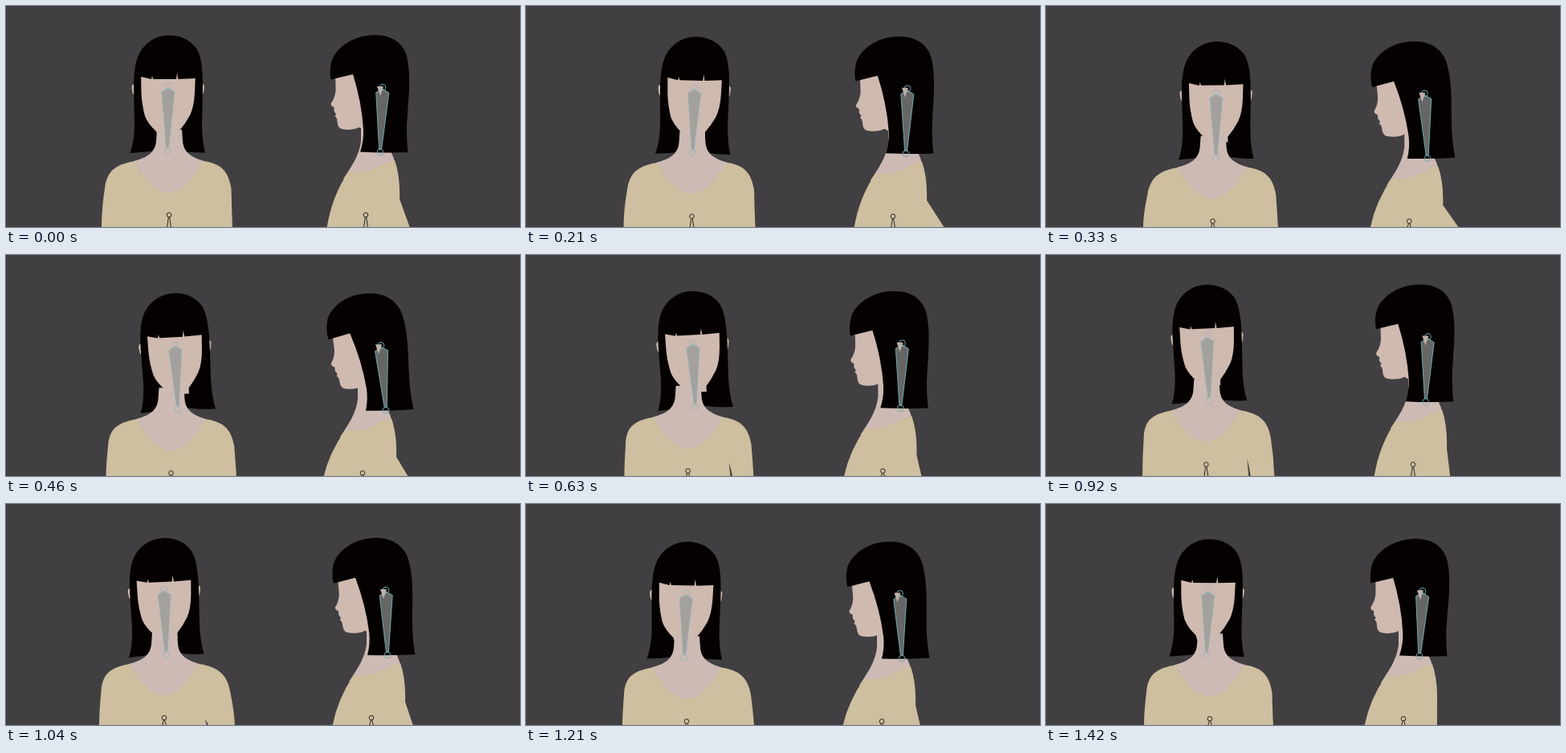
An HTML page with a canvas for the animation above (1.46 s loop, 640x275 px).

```html
<!DOCTYPE html>
<html lang="en">
<head>
<meta charset="utf-8">
<title>Walk cycle, front and side</title>
<style>
  html, body { margin: 0; height: 100%; overflow: hidden; background: #413f41; }
  canvas { display: block; }
</style>
</head>
<body>
<canvas id="stage" width="640" height="275"></canvas>
<script>
const ctx = document.getElementById('stage').getContext('2d');
const LOOP = 1460, CYCLE = 36, FPS = 24;
const BG = '#413f41', SKIN = '#cfbab0', NECK = '#cdbab4', SHIRT = '#cdbf9f', HAIR = '#060101';
const POSES = [0, 5, 11, 19, 25, 29, 34];

// Periodic spline through the key poses. With `mirror`, each pose also
// defines the opposite step half a cycle later.
function track(values, mirror, opposite = values) {
  const keys = POSES.map((t, i) => [t, values[i]]);
  if (mirror) POSES.forEach((t, i) => {
    const other = (t + CYCLE / 2) % CYCLE;
    if (!POSES.includes(other)) keys.push([other, mirror(opposite[i])]);
  });
  keys.sort((a, b) => a[0] - b[0]);
  const n = keys.length;
  const key = i => {
    const k = keys[(i + n) % n];
    return [k[0] + Math.floor(i / n) * CYCLE, k[1]];
  };
  const slope = i => {
    const a = key(i - 1), b = key(i + 1);
    return (b[1] - a[1]) / (b[0] - a[0]);
  };
  return f => {
    let i = n - 1;
    while (key(i)[0] > f) i--;
    const [t0, v0] = key(i), [t1, v1] = key(i + 1);
    const d = t1 - t0, u = (f - t0) / d, w = 1 - u;
    return w * w * ((1 + 2 * u) * v0 + u * d * slope(i)) +
           u * u * ((3 - 2 * u) * v1 - w * d * slope(i + 1));
  };
}

const same = v => v;
const around = m => v => 2 * m - v;
const leftArm = [-84, -85, -81, -81, -81, -80, -82];
const rightArm = [79, 79, 81.5, 86, 88, 84, 79];
const motion = {
  bob: track([0, 1.7, 11.3, -1.4, 6, 10.4, 7.2], same),
  frontChest: track([203, 206.5, 205.5, 202, 197, 200, 204], around(202.5)),
  frontNeck: track([201, 207.5, 214, 205, 199.5, 197, 200], around(205)),
  frontCrown: track([202, 210, 210.5, 206, 197, 199.5, 202], around(204.5)),
  sideChest: track([448, 457, 444, 455, 455, 443, 445], same),
  sideNeck: track([466, 473, 473, 472, 475, 468, 465], same),
  sideCrown: track([469, 475, 467, 475, 473, 465.5, 469], same),
  left: track(leftArm, v => -v, rightArm),
  right: track(rightArm, v => -v, leftArm),
  elbow: track([55, 64, 57, 42, 52, 48, 42])
};

const fill = (path, color) => {
  ctx.fillStyle = color;
  ctx.fill(path instanceof Path2D ? path : new Path2D(path));
};
const line = (path, color, width = 1) => {
  ctx.strokeStyle = color;
  ctx.lineWidth = width;
  ctx.stroke(new Path2D(path));
};
const ring = (x, y, r, color) => {
  ctx.strokeStyle = color;
  ctx.lineWidth = 1;
  ctx.beginPath();
  ctx.arc(x, y, r, 0, 7);
  ctx.stroke();
};

// Head parts are drawn in their rest position and lean about the neck joint;
// `roll` is how far the level lines tip along with the lean.
function inHead(rest, neck, crown, roll, draw) {
  const lean = (crown - neck.x - rest.lean) / 81;
  ctx.save();
  ctx.translate(neck.x, neck.y);
  ctx.transform(1, lean * roll, -lean, 1, 0, 0);
  ctx.translate(-rest.x, -rest.y);
  draw();
  ctx.restore();
}

function headBone(neck, crown, color, edge) {
  ctx.save();
  ctx.translate(neck.x, neck.y);
  ctx.rotate(Math.atan2(crown - neck.x, 81));
  const body = 'M0-79L-8-74 -1.5-4 1.5-4 8-74Z';
  fill(body, color);
  line(body, edge);
  ring(0, 0, 3.8, edge);
  ring(0, -81, 3.8, edge);
  ctx.restore();
}

function chestBone(x, y) {
  line(`M${x - .7} ${y + 3}L${x - 2.5} 276M${x + .7} ${y + 3}L${x + 2.5} 276`, '#2a2520');
  ring(x, y, 2.8, '#2a2520');
}

const front = {
  rest: { x: 201, y: 181, lean: 1 },
  hair: new Path2D('M154.5 183Q160 168 160 145L159 103C159 82 161 65 169 54C178 42 190 36.5 203 36.5C217 36.5 230 42 238 54C244 65 245 82 245 103L244 145Q244 168 248 182.5Q232 183 215 180L188 180Q172 182 154.5 183Z'),
  face: new Path2D('M168 82L236 82L235 108Q234 126 229 136Q223 147 216 155L216 162L189 162L187 156Q177 147 173 137Q169 122 168.5 108Z'),
  fringe: new Path2D('M165 80L168 88 181 91 182 87 183.2 91 212 91 213 83 214.3 91 237 90 240 78Z'),
  ears: new Path2D('M160 97Q155.5 97 157 104Q157.5 110 160 111ZM244 97Q248 97 246.5 104Q246 110 244 111Z')
};

const side = {
  rest: { x: 466, y: 182, lean: 3 },
  hair: new Path2D('M404.5 91.5Q402 80 406 67C412 52 430 38.5 453 36.5C475 34.5 490 42 497 57C502 68 503 90 501.5 112Q500 130 499 150Q499 170 500.5 182Q470 183 441 181.5Q445.5 168 445 154Q443 120 432 85Z'),
  face: new Path2D('M410 82L410.5 102Q411 112 404.5 121.5Q404.5 125 408.5 126L408.5 131 411 134.5 409.5 137Q412.5 139 412.5 144Q413 152 418 153Q431 155.5 440 151L448 156 452 82Z')
};

function drawFront(f, y) {
  const x = motion.frontChest(f), crown = motion.frontCrown(f);
  const neck = { x: motion.frontNeck(f), y: 181 + y };
  const cy = 260 + y, L = motion.left(f), R = motion.right(f);

  inHead(front.rest, neck, crown, 1, () => {
    fill(front.ears, SKIN);
    fill(front.hair, HAIR);
    fill(front.face, SKIN);
    fill(front.fringe, HAIR);
  });
  fill(`M${x - 15} ${cy - 106}L${x - 16} ${cy - 92}
    C${x - 17} ${cy - 80} ${x - 24} ${cy - 72} ${x - 44} ${cy - 67}L${x} ${cy}L${x + 44} ${cy - 67}
    C${x + 26} ${cy - 72} ${x + 18} ${cy - 79} ${x + 17} ${cy - 92}L${x + 16} ${cy - 106}Z`, NECK);
  fill(`M${x - 43} ${cy - 67}C${x - 63} ${cy - 63} ${x - 77} ${cy - 58} ${x + L / 2 - 38} ${cy - 33}
    Q${x + L} ${cy - 8} ${x + L} 276L${x + R} 276Q${x + R - 1} ${cy - 10} ${x + R / 2 + 38} ${cy - 33}
    C${x + R / 2 + 34} ${cy - 57} ${x + 63} ${cy - 64} ${x + 43} ${cy - 67}
    C${x + 32} ${cy - 50} ${x + 18} ${cy - 28} ${x} ${cy - 28}
    C${x - 18} ${cy - 28} ${x - 34} ${cy - 50} ${x - 43} ${cy - 67}Z`, SHIRT);

  // Gap between body and arm while the arm swings out
  const gap = 35 - 4.7 * Math.abs(f - 19);
  if (gap > 0) fill(`M${x + 51} ${275 - gap}Q${x + 54} ${275 - gap / 2} ${x + 55.5} 276L${x + 53} 276Z`, BG);

  headBone(neck, crown, 'rgba(160,158,154,.9)', '#9ab4b5');
  chestBone(x, cy);
}

function drawSide(f, y) {
  const x = motion.sideChest(f), crown = motion.sideCrown(f);
  const neck = { x: motion.sideNeck(f), y: 182 + y };
  const cy = 260 + y, back = x + motion.elbow(f);

  fill(`M${x - 6} ${cy - 115}L${x - 6} ${cy - 92}
    C${x - 8} ${cy - 74} ${x - 18} ${cy - 60} ${x - 28} ${cy - 45}L${x} ${cy - 30}L${x + 38} ${cy - 60}
    Q${x + 35} ${cy - 72} ${x + 29} ${cy - 84}L${x + 20} ${cy - 115}Z`, NECK);
  fill(`M${x - 22} ${cy - 53}Q${x - 42} ${cy - 24} ${x - 48.5} 276
    L${back} 276L${x + 42} ${cy - 20}Q${x + 43} ${cy - 48} ${x + 36} ${cy - 68}
    C${x + 24} ${cy - 68} ${x + 10} ${cy - 50} ${x - 22} ${cy - 53}Z`, SHIRT);

  inHead(side.rest, neck, crown, .35, () => {
    fill(side.face, SKIN);
    fill(side.hair, HAIR);
  });
  headBone(neck, crown, 'rgba(108,108,108,.95)', '#6fa9af');
  fill(`M${crown - 7} ${neck.y - 82}l8 0 -4 12z`, '#bdb0a8');
  chestBone(x, cy);
}

function render() {
  const t = performance.now() % LOOP;
  const f = Math.min(34, Math.floor((t + 5) * FPS / 1000));
  const y = motion.bob(f);
  ctx.fillStyle = BG;
  ctx.fillRect(0, 0, 640, 275);
  drawFront(f, y);
  drawSide(f, y);
  requestAnimationFrame(render);
}
render();
</script>
</body>
</html>
```
